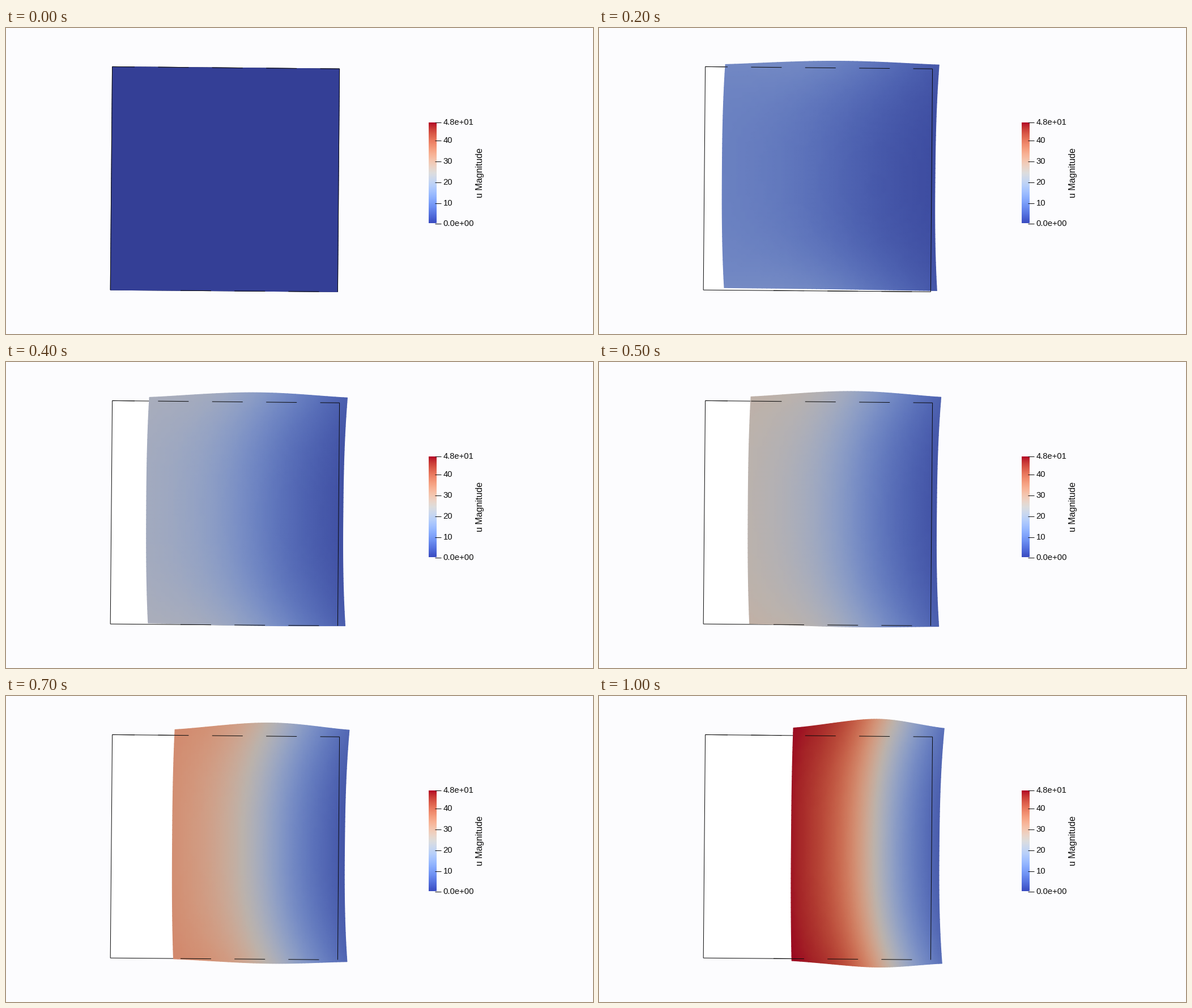
A matplotlib script that plays this animation: 1036x541 px, repeating every 1.1 s.

```python
import numpy as np
import matplotlib.pyplot as plt
from matplotlib.animation import FuncAnimation
from matplotlib.colors import ListedColormap

W, H, DPI = 1036, 541, 100
PX = 72 / DPI
FRAMES, STEP = 11, 100
VMAX = 48.2
PX_PER_UNIT = 3.25
INK = "#0a0a0a"

# Corners of the sheet at rest
TL, TR, BL, BR = (187.6, 68.4), (588.6, 72.2), (184.2, 463.2), (585.4, 466.4)

plt.rcParams["font.family"] = "Liberation Sans"
fig = plt.figure(figsize=(W / DPI, H / DPI), dpi=DPI, facecolor="#fcfcfe")
ax = fig.add_axes([0, 0, 1, 1])
ax.set_axis_off()

# Meshed surface looks darker than the plain colour scale
scale = plt.get_cmap("coolwarm")(np.linspace(0, 1, 256))
shaded = scale.copy()
shaded[:, :3] = scale[:, :3] * (0.84, 0.795, 0.765) + 0.01
sheet_cmap = ListedColormap(shaded)

T, S = np.meshgrid(np.linspace(0, 1, 49), np.linspace(0, 1, 49))


def bilinear(tl, tr, bl, br):
    top = tl + (tr - tl) * T
    bottom = bl + (br - bl) * T
    return top + (bottom - top) * S


X0 = bilinear(TL[0], TR[0], BL[0], BR[0])
Y0 = bilinear(TL[1], TR[1], BL[1], BR[1])
ARCH = np.sin(np.pi * T)
WAVE = np.sin(2 * np.pi * T)
BELLY = 1 - np.abs(2 * S - 1) ** 2.6
RIM = np.abs(2 * S - 1) ** 2


def displacement(k):
    """Pixel offsets of the sheet and its displacement magnitude at step k."""
    if k == 0:
        zero = np.zeros_like(T)
        return zero, zero, zero
    ux = bilinear(5.5 + 15 * k, 9.4 + 1.13 * k, 7 + 14.9 * k, 8.7 + 1.12 * k)
    ux -= BELLY * ((1 - T) * (5.3 - 0.3 * k) + T * (4.8 + 0.22 * k))
    ux += ARCH * (0.5 * k + (1 - BELLY) * (4 + 0.5 * k)) + 0.8 * k * WAVE

    uy = bilinear(-2 - k, -5 - k, -6.1 + 1.1 * k, -4 + 1.05 * k)
    bulge = np.abs(ARCH) ** 1.2
    uy += bulge * ((1 - S) * (-3.9 - 1.2 * k) + S * (-2.6 + 1.15 * k))

    uz = 12 * ARCH * RIM
    mag = np.sqrt(ux**2 + (uy + 5) ** 2 + uz**2) / PX_PER_UNIT
    return ux, uy, mag


def line(p, q, z):
    ax.plot([p[0], q[0]], [p[1], q[1]], color=INK, lw=PX, zorder=z,
            solid_capstyle="butt")


def dashes(p, q, start, period, length):
    for x in np.arange(start, q[0], period):
        ends = np.clip([x, x + length], p[0], q[0])
        ys = np.interp(ends, [p[0], q[0]], [p[1], q[1]])
        line((ends[0], ys[0]), (ends[1], ys[1]), 4)


def draw_outline():
    ax.fill(*zip(TL, TR, BR, BL), color="white", lw=0, zorder=1)
    line(TL, TR, 2)
    line(BL, BR, 2)
    line(TL, BL, 4)
    line(TR, BR, 4)
    dashes(TL, TR, 173, 95.4, 54)
    dashes(BL, BR, 308, 95.2, 54)


def draw_legend():
    ramp = np.linspace(1, 0, 256)[:, None]
    ax.imshow(ramp, cmap="coolwarm", extent=(746, 760, 345, 167),
              aspect="auto", interpolation="bilinear", zorder=2)
    labels = ["4.8e+01", "40", "30", "20", "10", "0.0e+00"]
    for y, label in zip([166.5, 198.5, 235.5, 272.5, 309.5, 345.5], labels):
        line((757, y), (767.5, y), 3)
        ax.text(771.5, y + 4.6, label, size=14.7 * PX, color=INK)
    ax.text(841, 299.5, "u Magnitude", size=16 * PX, color=INK, rotation=90,
            rotation_mode="anchor", ha="left", va="baseline")


draw_outline()
draw_legend()
ax.set_xlim(0, W)
ax.set_ylim(H, 0)
sheet = None


def update(k):
    global sheet
    if sheet is not None:
        sheet.remove()
    ux, uy, mag = displacement(k)
    sheet = ax.pcolormesh(X0 + ux, Y0 + uy, mag, shading="gouraud",
                          cmap=sheet_cmap, vmin=0, vmax=VMAX, zorder=3)
    return [sheet]


anim = FuncAnimation(fig, update, frames=FRAMES, interval=STEP,
                     init_func=lambda: update(0), repeat=True, repeat_delay=0)
plt.show()
```
